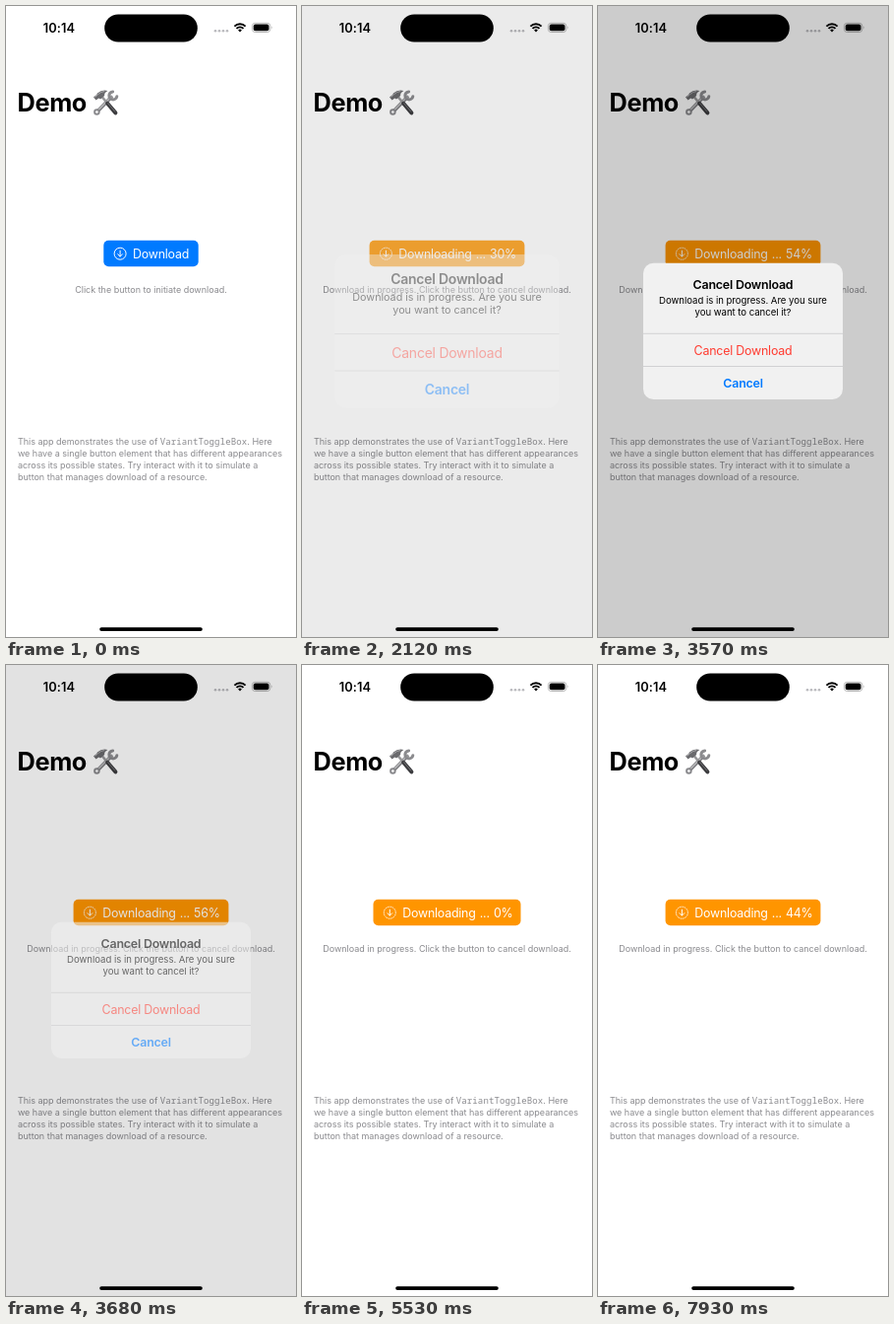
These frames come from a looping animation (295x640 px, 8000 ms). An HTML page:

```html
<!DOCTYPE html>
<html lang="en">
<head>
<meta charset="utf-8">
<title>Download demo</title>
<style>
  html, body { margin: 0; width: 100%; height: 100%; overflow: hidden; background: #fff; }
  svg { display: block; width: 100vw; height: 100vh; }
  text { font-family: Inter, sans-serif; white-space: pre; }
  .mid { text-anchor: middle; }
  .small { font-size: 9px; letter-spacing: -.01px; fill: #8a8a8e; }
  .mono { font-family: "Noto Sans Mono", "DejaVu Sans Mono", monospace; letter-spacing: .14px; }
  .body { font-size: 12.4px; letter-spacing: -.2px; }
  .semi { font-weight: 600; }
  .note { font-size: 9.6px; letter-spacing: -.03px; }
</style>
</head>
<body>
<svg viewBox="0 0 295 640">
  <rect width="295" height="640" fill="#fff"/>

  <!-- status bar -->
  <text class="semi" x="37.8" y="26.6" font-size="12.8" letter-spacing=".08">10:14</text>
  <rect x="100.2" y="8.4" width="94.6" height="28.1" rx="14"/>
  <g fill="#b9b9bd">
    <circle cx="213" cy="25.2" r="1.3"/><circle cx="217" cy="25.2" r="1.3"/>
    <circle cx="221" cy="25.2" r="1.3"/><circle cx="225" cy="25.2" r="1.3"/>
  </g>
  <g fill="none" stroke="#000" stroke-width="2">
    <path d="M232.4 20.6a8 8 0 0 1 11.2 0"/>
    <path d="M234.5 22.9a5 5 0 0 1 7 0"/>
  </g>
  <path d="M236.1 24.5a2.8 2.8 0 0 1 3.8 0L238 26.6z"/>
  <rect x="250.4" y="17.3" width="18.4" height="9.2" rx="3" fill="none" stroke="#a8a8a8" stroke-width=".8"/>
  <rect x="251.7" y="18.6" width="15.8" height="6.6" rx="1.9"/>
  <path d="M269.9 20.3q1.4 1.6 0 3.2z" fill="#a8a8a8"/>

  <!-- heading with crossed tools -->
  <text x="11.6" y="107" font-size="25.3" font-weight="700" letter-spacing="-.4">Demo</text>
  <g stroke-linecap="round" fill="none">
    <path d="M92.5 107.5L107 92.5" stroke="#7d7d80" stroke-width="3.6"/>
    <path d="M92.3 107.1L107 92" stroke="#bababc" stroke-width="1.5"/>
    <circle cx="92.4" cy="107.5" r="2.3" stroke="#89898c" stroke-width="1.9" fill="#fff"/>
    <path d="M108.6 86.9a4 4 0 1 0 4.2 4.8" stroke="#8b8b8e" stroke-width="3"/>
    <path d="M98 92.5L104 99.7" stroke="#98989a" stroke-width="2.6"/>
    <path d="M103.2 98.8L111.4 108.4" stroke="#3d3d40" stroke-width="4"/>
    <path d="M103.7 98.7L110.6 106.8" stroke="#707073" stroke-width="1"/>
  </g>
  <path d="M89 92.6L91.6 95.6L94.3 93.4L96 94.4L100.2 91Q99.6 88.2 103.4 86Q97.6 84.4 92.9 88.6L92.2 90z" fill="#6a6a6d"/>
  <path d="M90.4 92.5L93.4 89.8Q96.4 86.8 100.2 86.5" fill="none" stroke="#a9a9ac" stroke-width="1"/>

  <!-- button -->
  <g id="button">
    <rect id="plate" y="237.8" height="26.4" rx="5"/>
    <g id="icon" fill="none" stroke="#fff" stroke-width="1" stroke-linecap="round" stroke-linejoin="round">
      <circle id="ring" r="6"/>
      <path d="M0-3V2.8M-2.4.5L0 2.9L2.4.5"/>
    </g>
    <text id="label" class="body" y="255.7" fill="#fff"></text>
  </g>
  <text id="hint" class="small mid" x="147.5" y="290.6"></text>

  <text class="small" y="444.6"><tspan x="11.9">This app demonstrates the use of</tspan><tspan class="mono" x="156.7">VariantToggleBox</tspan><tspan x="245.3">. Here</tspan></text>
  <text class="small" x="11.9" y="456.6">we have a single button element that has different appearances</text>
  <text class="small" x="11.9" y="468.6">across its possible states. Try interact with it to simulate a</text>
  <text class="small" x="11.9" y="480.6">button that manages download of a resource.</text>

  <rect x="95.2" y="630.2" width="104.6" height="3.8" rx="1.9"/>

  <!-- alert -->
  <rect id="dim" width="295" height="640"/>
  <g id="alert">
    <g id="panel">
      <rect x="46" y="260.7" width="203" height="138.4" rx="10.5" fill="#f1f1f1"/>
      <path d="M46 332.3H249M46 365.5H249" stroke="#cacacc" stroke-width=".8"/>
    </g>
    <g id="words" class="mid">
      <text class="body semi" x="147.5" y="287.2">Cancel Download</text>
      <text class="note" x="147.5" y="302.4">Download is in progress. Are you sure</text>
      <text class="note" x="147.5" y="314.4">you want to cancel it?</text>
      <text class="body" x="147.5" y="353.9" fill="#ff3b30">Cancel Download</text>
      <text class="body semi" x="147.5" y="387.2" fill="#007aff">Cancel</text>
    </g>
  </g>
</svg>
<script>
const LOOP = 8000, MID = 147.5, START = 500, RESTART = 5530;
const el = id => document.getElementById(id);
const set = (id, attrs) => {
  for (const k in attrs) el(id).setAttribute(k, attrs[k]);
};
const clamp = x => Math.max(0, Math.min(1, x));

// Runs of evenly spaced screen updates: first, last, count.
const runs = [
  [0, 0, 1], [500, 1270, 8], [1380, 2120, 8], [2220, 3020, 8],
  [3130, 3680, 6], [3790, 3910, 2], [4020, 4020, 1], [5530, 5530, 1],
  [5680, 6010, 4], [6170, 6940, 8], [7050, 7820, 8], [7930, 7930, 1]
];
const beats = runs.flatMap(([a, b, n]) =>
  Array.from({ length: n }, (_, i) => Math.round((a + (b - a) * i / Math.max(1, n - 1)) / 10) * 10));
const first = beats.indexOf(START), second = beats.indexOf(RESTART);

// Two percent per update; one update is held, one is skipped.
function percent(i) {
  const t = beats[i];
  return t < RESTART
    ? 2 * (i - first - (t >= 3130 ? 1 : 0))
    : 2 * (i - second + (t >= 6170 ? 1 : 0));
}

function alertLevel(t) {
  if (t < 3570) return 1 - (1 - clamp((t - 2030) / 400)) ** 2;
  return 1 - clamp((t - 3570) / 250);
}

function drawButton(i) {
  const busy = beats[i] >= START;
  const n = busy ? percent(i) : 0;
  const w = !busy ? 96.4 : n < 10 ? 150 : n < 20 ? 155.6 : 157.8;
  const left = MID - w / 2;
  set("plate", { x: left, width: w, fill: busy ? "#ff9500" : "#007aff" });
  set("icon", { transform: `translate(${left + 16.8} 251.2)` });
  set("ring", { "stroke-dasharray": busy ? "1.25 .635" : "none", "stroke-linecap": "butt" });
  set("label", { x: left + 29.7, "word-spacing": busy ? .8 : 0 });
  el("label").textContent = busy ? `Downloading ... ${n}%` : "Download";
  el("hint").textContent = busy
    ? "Download in progress. Click the button to cancel download."
    : "Click the button to initiate download.";
}

function draw(time) {
  let i = beats.length - 1;
  while (beats[i] > time) i--;
  const t = beats[i], level = alertLevel(t);
  drawButton(i);
  const pressed = t >= 2010 && t < 2320 ? clamp((2320 - t) / 200) : 0;
  set("button", { opacity: 1 - .2 * pressed });
  set("dim", { opacity: .2 * level });
  const scale = t < 3000 ? 1.21 - .21 * level : 1;
  set("alert", { transform: `translate(${MID} 330) scale(${scale}) translate(${-MID} -330)` });
  set("panel", { opacity: level });
  set("words", { opacity: level });
}

const origin = performance.now();
function tick() {
  draw((performance.now() - origin) % LOOP);
  requestAnimationFrame(tick);
}
tick();
</script>
</body>
</html>
```
